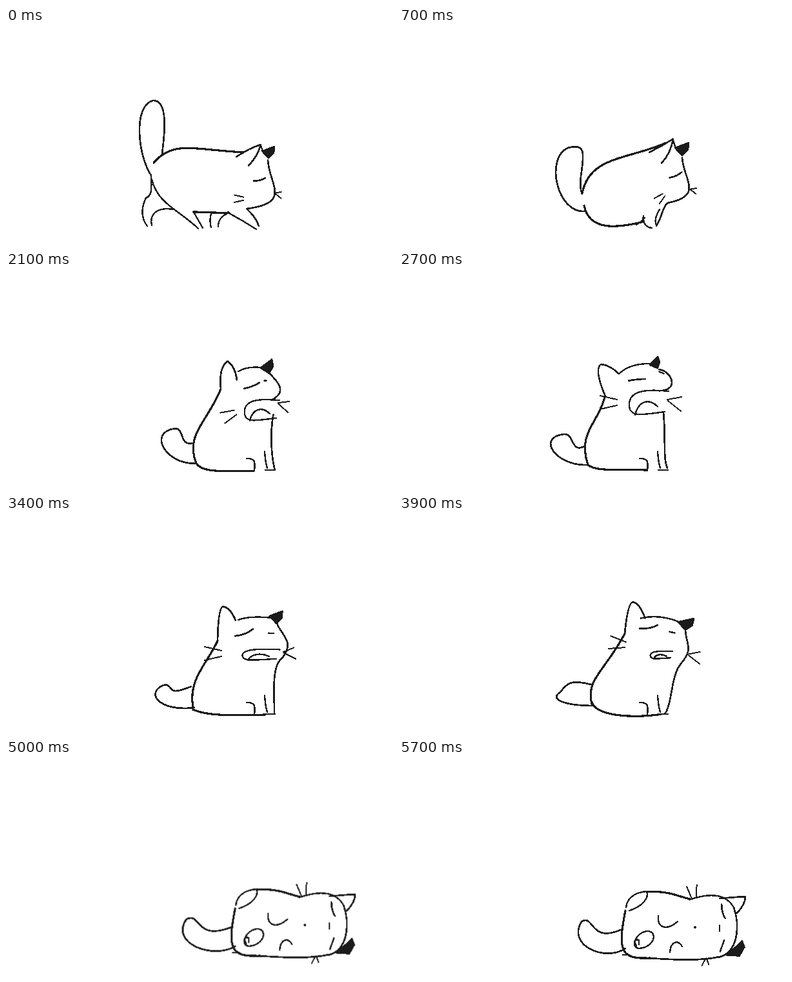
An HTML page without scripts that plays this animation: 600x337 px, repeating every 5800 ms.

```html
<!DOCTYPE html>
<html lang="en">
<head>
<meta charset="utf-8">
<title>Sleepy cat</title>
<style>
html, body { margin: 0; width: 100%; height: 100%; overflow: hidden; background: #fff; }
svg { display: block; width: 100%; height: 100%; }
path { fill: none; stroke: #1b1b1b; stroke-linecap: round; stroke-linejoin: round;
  shape-rendering: crispEdges; vector-effect: non-scaling-stroke; }
path, g { animation: 5.8s steps(8) infinite; }

/* outline: walk, crouch, sit, yawn, doze, tip over, lie */
@keyframes tail {
  0% { d: path("M225 230C205 200 196 122 228 113C252 112 246 165 242 196"); }
  12% { d: path("M289 286C245 290 226 203 262 187C306 174 272 232 284 259"); }
  27.5% { d: path("M296 297C250 300 224 245 265 239C280 238 270 262 287 265"); }
  46.5% { d: path("M292 301C244 303 212 258 256 253C272 251 266 285 289 271"); }
  58.6% { d: path("M292 299C236 306 214 274 247 263C262 266 248 282 287 266"); }
  75.8% { d: path("M308 293C270 285 252 296 254 286C258 255 288 228 309 260"); }
  84.4%, 100% { d: path("M351 294C320 315 260 290 283 252C303 240 295 287 346 264"); }
}
@keyframes back {
  0% { d: path("M229 210C260 175 290 190 369 194"); }
  12% { d: path("M284 258C295 200 355 205 412 180"); }
  27.5% { d: path("M296 297C278 255 315 232 341 176"); }
  46.5% { d: path("M293 301C276 250 310 235 319 195"); }
  58.6% { d: path("M290 298C282 255 312 230 328 195"); }
  75.8% { d: path("M308 290C295 255 330 250 372 172"); }
  84.4%, 100% { d: path("M384 206C420 203 437 215 452 217"); }
}
@keyframes belly {
  0% { d: path("M290 287C308 287 327 289 346 288"); }
  12% { d: path("M287 277C295 318 340 312 380 302"); }
  27.5% { d: path("M296 297C306 316 340 311 384 312"); }
  46.5% { d: path("M293 301C304 311 335 308 384 309"); }
  58.6% { d: path("M290 302C310 311 345 312 402 310"); }
  75.8% { d: path("M308 278C300 312 370 320 409 309"); }
  84.4%, 100% { d: path("M351 235C338 300 345 311 390 309"); }
}
@keyframes chest {
  0% { d: path("M373 282C382 290 388 297 392 309"); }
  12% { d: path("M416 273C407 283 408 295 399 309"); }
  27.5% { d: path("M417 225C406 250 413 285 417 310"); }
  46.5% { d: path("M410 219C414 260 409 290 416 306"); }
  58.6% { d: path("M428 222C410 235 417 285 416 309"); }
  75.8% { d: path("M447 238C432 262 432 298 408 309"); }
  84.4%, 100% { d: path("M497 307C460 315 420 311 370 308"); }
}
@keyframes face {
  0% { d: path("M406 206C408 245 444 273 373 282"); }
  12% { d: path("M439 202C440 235 474 262 416 273"); }
  27.5% { d: path("M413 163C418 180 439 186 418 209"); }
  46.5% { d: path("M403 152C425 155 435 188 400 185"); }
  58.6% { d: path("M420 167C426 186 450 196 427 223"); }
  75.8% { d: path("M468 188C464 215 465 216 447 238"); }
  84.4%, 100% { d: path("M519 230C528 255 528 300 495 308"); }
}
@keyframes crown {
  0% { d: path("M395 183Q397 189 399 195"); }
  12% { d: path("M425 175Q427 182 430 190"); }
  27.5% { d: path("M371 153Q385 149 399 153"); }
  46.5% { d: path("M341 159Q358 142 392 143"); }
  58.6% { d: path("M360 162Q380 155 412 159"); }
  75.8% { d: path("M390 157Q430 150 460 173"); }
  84.4%, 100% { d: path("M450 218Q502 200 519 230"); }
}
@keyframes ear {
  0% { d: path("M357 201Q378 187 395 182Q390 200 376 215"); }
  12% { d: path("M388 194Q408 184 425 173Q421 196 407 211"); }
  27.5% { d: path("M341 178Q346 146 362 136Q373 150 368 174"); }
  46.5% { d: path("M320 194Q302 152 313 144Q327 145 341 159"); }
  58.6% { d: path("M328 195Q329 145 336 141Q348 143 356 163"); }
  75.8% { d: path("M372 172Q380 127 389 127Q399 130 407 156"); }
  84.4%, 100% { d: path("M497 216Q520 214 537 213Q537 225 524 239"); }
}

/* features: one drawing each, placed on the head */
@keyframes darkEar {
  0% { translate: 407px 193px; rotate: 0deg; scale: .9; }
  12% { translate: 439px 188px; rotate: 0deg; scale: 1; }
  27.5% { translate: 410px 151px; rotate: -10deg; scale: 1.1; }
  46.5% { translate: 397px 142px; rotate: -25deg; scale: .8; }
  58.6% { translate: 419px 157px; rotate: 0deg; scale: .95; }
  75.8% { translate: 471px 178px; rotate: 12deg; scale: 1.3 1; }
  84.4%, 100% { translate: 523px 297px; rotate: -30deg; scale: 1.5 .9; }
}
@keyframes eye {
  0% { translate: 393px 237px; rotate: 10deg; scale: .75; }
  12% { translate: 429px 230px; rotate: 0deg; scale: .85; }
  27.5% { translate: 388px 184px; rotate: -6deg; scale: 1.1; }
  46.5% { translate: 369px 168px; rotate: -12deg; scale: 1.2 -.3; }
  58.6% { translate: 369px 183px; rotate: 3deg; scale: 1.25; }
  75.8% { translate: 404px 165px; rotate: 26deg; scale: 1.1; }
  84.4%, 100% { translate: 502px 236px; rotate: 100deg; scale: .9; }
}
@keyframes farEye {
  0%, 27.5% { translate: 399px 177px; rotate: 0deg; scale: 0; }
  46.5% { translate: 407px 157px; rotate: 20deg; scale: 1; }
  58.6% { translate: 411px 183px; rotate: 5deg; scale: 1; }
  75.8% { translate: 436px 180px; rotate: 20deg; scale: 1; }
  84.4%, 100% { translate: 501px 290px; rotate: 110deg; scale: 2.4; }
}
@keyframes whiskers {
  0% { translate: 361px 266px; rotate: 0deg; scale: .55; }
  12% { translate: 405px 265px; rotate: -42deg; scale: .55; }
  27.5% { translate: 358px 235px; rotate: -38deg; scale: .75; }
  46.5% { translate: 325px 203px; rotate: 0deg; scale: 1; }
  58.6% { translate: 321px 214px; rotate: 0deg; scale: 1; }
  75.8% { translate: 357px 183px; rotate: 18deg; scale: .9; }
  84.4%, 100% { translate: 456px 206px; rotate: 80deg; scale: .75; }
}
@keyframes farWhiskers {
  0% { translate: 417px 258px; rotate: 0deg; scale: .45; }
  12% { translate: 452px 252px; rotate: 0deg; scale: .4; }
  27.5% { translate: 425px 208px; rotate: 5deg; scale: .65; }
  46.5% { translate: 416px 200px; rotate: 0deg; scale: 1; }
  58.6% { translate: 430px 213px; rotate: -12deg; scale: .8; }
  75.8% { translate: 466px 220px; rotate: 10deg; scale: .9; }
  84.4%, 100% { translate: 476px 309px; rotate: 80deg; scale: .5; }
}
@keyframes mouth {
  0%, 12% { translate: 440px 255px; scale: 0; }
  27.5% { translate: 402px 222px; scale: .82 .78; }
  46.5% { translate: 387px 203px; scale: 1; }
  58.6% { translate: 395px 216px; scale: .95 .45; }
  75.8% { translate: 418px 217px; scale: .18; }
  84.4%, 100% { translate: 459px 261px; scale: .02; }
}

/* paws: one drawing per posture, swapped at once */
.paws { opacity: 0; animation-timing-function: step-end; }
@keyframes crouch { 0% { opacity: 0; } 9% { opacity: 1; } 19% { opacity: 0; } }
@keyframes sit { 0% { opacity: 0; } 19% { opacity: 1; } 68% { opacity: 0; } }
@keyframes tip { 0% { opacity: 0; } 68% { opacity: 1; } 80% { opacity: 0; } }
@keyframes lie { 0% { opacity: 0; } 80%, 100% { opacity: 1; } }

.legs { transform-origin: 300px 311px; }
@keyframes sink {
  0% { transform: none; }
  12%, 100% { transform: translateX(20px) scaleY(0); }
}
@keyframes settle {
  0%, 75.8%, 92%, 100% { transform: none; }
  84.4% { transform: translate(5px, -4px); }
}
.tail { transform-origin: 348px 290px; }
@keyframes wag {
  0%, 75.8%, 98.2%, 100% { transform: none; }
  84.4%, 93% { transform: scaleX(1.12); }
}
</style>
</head>
<body>
<svg viewBox="0 0 600 337" preserveAspectRatio="none" stroke-width="2.4">
<g style="animation-name:settle">
  <g class="tail" style="animation-name:wag" stroke-width="2.7">
    <path style="animation-name:tail"/>
  </g>
  <g stroke-width="3.2">
    <path style="animation-name:back"/>
    <path style="animation-name:belly"/>
  </g>
  <g stroke-width="2.7">
    <path style="animation-name:chest"/>
    <path style="animation-name:face"/>
    <path style="animation-name:ear"/>
  </g>
  <path style="animation-name:crown"/>
  <path style="animation-name:darkEar;fill:#1b1b1b" d="M-11-1L10-9L9 2L0 11Z"/>
  <path style="animation-name:eye" stroke-width="2.7" d="M-11 4Q2 2 11-6"/>
  <path style="animation-name:farEye" d="M-4 0H4"/>
  <path style="animation-name:mouth" d="M31-17C-7-21-30-17-30 4C-30 23-15 21 25 15M-21 20C-15-3 1-6 14 7"/>
  <g stroke-width="2">
    <path style="animation-name:whiskers" d="M-13-10L13-4M-13 11L13 5"/>
    <path style="animation-name:farWhiskers" d="M0-1L22-5M1 1L21 17"/>
  </g>
  <path class="legs" style="animation-name:sink" d="M225 229C225 245 228 262 217 265C210 280 209 296 219 309M226 236C235 275 270 285 298 313M226 308C222 290 235 279 259 283M292 289L305 312M318 290Q315 300 318 311M329 310Q329 296 342 290M346 289Q368 301 388 314"/>
  <path class="paws" style="animation-name:crouch" d="M368 307Q376 302 381 296M379 293C377 302 382 311 392 312M404 283Q396 296 398 306"/>
  <path class="paws" style="animation-name:sit" d="M373 291C385 291 387 294 385 310M401 280Q402 296 405 306M402 309H417"/>
  <path class="paws" style="animation-name:tip" d="M361 288Q372 298 358 309M380 264L383 283M400 272Q388 284 387 297M376 300Q380 296 390 300M400 297Q418 298 406 309M318 307L340 309"/>
  <path class="paws" style="animation-name:lie" d="M352 230C354 211 372 206 384 205C388 215 378 228 357 235M372 294C358 292 367 268 386 267C401 268 397 292 372 294M368 290Q362 278 372 281V288M402 243C400 262 415 267 432 252M420 300C421 284 432 279 439 291M347 304H357M497 258V267"/>
</g>
</svg>
</body>
</html>
```
